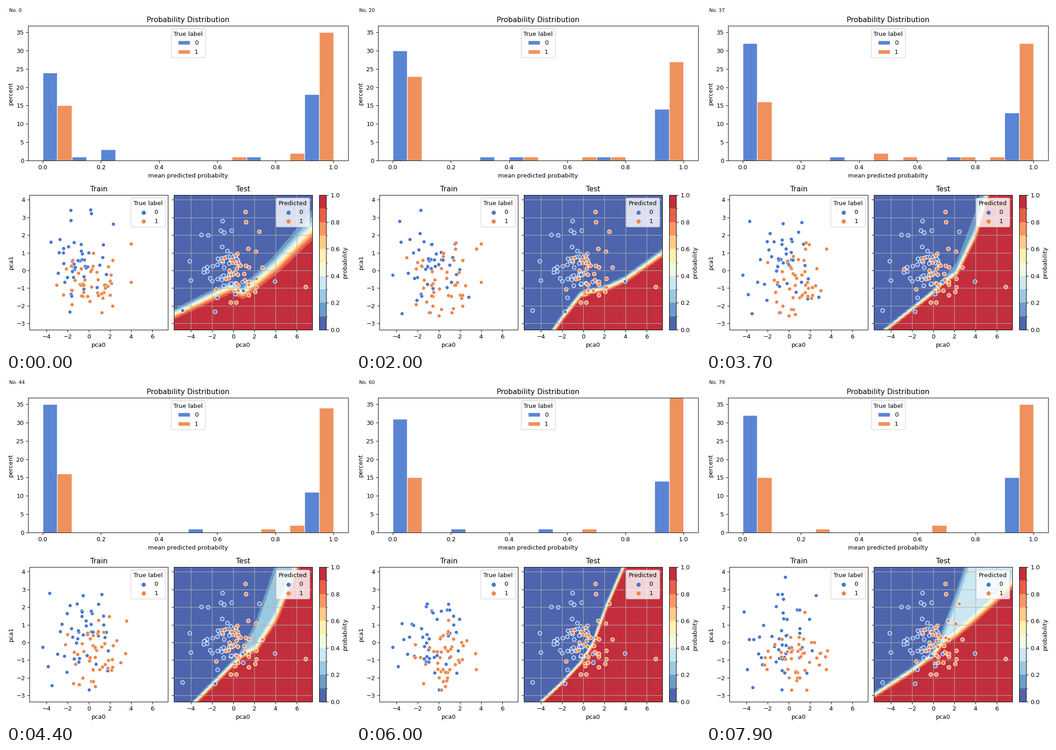
Write a matplotlib script that moves like this. It is 748x748 px and loops after 8 s.

```python
import numpy as np
import matplotlib.pyplot as plt
from matplotlib.animation import FuncAnimation
from matplotlib.cm import ScalarMappable
from matplotlib.colors import BoundaryNorm, ListedColormap
from matplotlib.patches import Patch

SIZE, FRAMES = 748, 80
COLORS = np.array(["#4878D0", "#EE854A"])
XLIM, YLIM = (-5.61, 7.48), (-3.36, 4.27)
PX_X, PX_Y = 23.0, 38.4  # pixels per data unit
X, Y = np.linspace(*XLIM, 66), np.linspace(*YLIM, 39)

# Poses of the model: everything in between is interpolated
KEYS = np.array([0, 12, 28, 37, 51, 60, 79])
TOTALS = (47, 53)
HEADS = np.array([(24, 28, 31, 32, 36, 31, 32), (15, 21, 24, 16, 18, 15, 15)])
TAILS = np.array([(18, 18, 12, 13, 11, 14, 15), (35, 30, 25, 32, 33, 37, 35)])
NODES = (-5.6, -2, -.2, .9, 2.2, 4, 7.5)
EDGE = np.array([  # height of the decision edge at each node
    (-2.5, -1.45, -.97, -1.3, -.7, .15, 2.2),
    (-8, -3.25, -1.15, -.27, .08, .9, 3.4),
    (-3.5, -2.1, -1.55, -2.05, -2.1, -1.97, -1.58),
    (-3.9, -2.2, -1.35, -.72, -.2, 2, 9),
    (-4.9, -2.5, -1.25, -.77, -.6, .4, 3.45),
    (-4.3, -2.3, -1.15, -.13, 2, 4.5, 10),
    (-3, -1.6, -.8, -.08, .4, 1.33, 3.25)])
LIFT = np.array([.15, 0, 0, .4, 1.3, 0, 1.25])      # slope of the plateau edge
PLATEAU = np.array([.25, 0, 0, .15, .35, 0, .35])   # probability on it
SOFT = np.array([5.5, 2.2, 3, 2.2, 3, 1.8, 3])      # blur in pixels

rng = np.random.default_rng(7)


def span(n):
    """Key interval holding frame n and the fraction through it."""
    i = min(np.searchsorted(KEYS, n, "right") - 1, len(KEYS) - 2)
    return i, (n - KEYS[i]) / (KEYS[i + 1] - KEYS[i])


def mix(values, n):
    i, f = span(n)
    return values[i] * (1 - f) + values[i + 1] * f


def noise(n, size, seed=0):
    """Retraining noise, fading out at the keys."""
    r = np.random.default_rng((seed, n))
    return np.sin(np.pi * span(n)[1]) * r.normal(size=size)


def step(h, soft):
    slope = np.gradient(h, X) * PX_Y / PX_X
    d = (h - Y[:, None]) * PX_Y / np.sqrt(1 + slope ** 2)
    return 1 / (1 + np.exp(-np.clip(d / soft, -12, 12)))


def field(n):
    shift, tilt = noise(n, 2) * (.15, .04)
    lower = np.interp(X, NODES, mix(EDGE, n)) + shift + tilt * X
    upper = lower + mix(LIFT, n) * np.maximum(X - .4, 0)
    soft = mix(SOFT, n) * np.linspace(.8, 1.3, X.size)
    c = mix(PLATEAU, n)
    return c * step(upper, soft) + (1 - c) * step(lower, soft)


def counts(n, label):
    head, tail = mix(HEADS[label], n), mix(TAILS[label], n)
    jitter = noise(n, 1, 1 + label)[0]
    out = np.zeros(10, int)
    out[0], out[9] = round(head + jitter), round(tail - jitter)
    r = np.random.default_rng((3 + label, n))
    for b in r.integers(1, 9, max(TOTALS[label] - out.sum(), 0)):
        out[b] += 1
    return out


def cloud(shape, mean, sd, clip):
    return mean + sd * np.clip(rng.normal(size=(*shape, 2)), -clip, clip)


# Training sample: slots whose points are replaced one after another
LIFE, SLOTS = 33, 46
TRAIN = [cloud((SLOTS, 4), (-.6, .5), (1.7, 1.45), 2.2),
         cloud((SLOTS, 4), (.5, -.5), (1.6, 1.0), 2.2)]
OFFSETS = [rng.permutation(SLOTS) * LIFE / SLOTS for _ in TRAIN]


def train_points(n, label):
    age = ((n + OFFSETS[label]) // LIFE).astype(int)
    return TRAIN[label][np.arange(SLOTS), age]


# Test sample: two clouds and a few far points; scores drift around zero
FAR0 = [(-1, 2.79), (-3, 2.01), (-4.1, .52), (-4, -.57), (-4.78, -2.27),
        (3.96, -.63), (-1.7, -2.34)]
FAR1 = [(1.17, 3.31), (1.22, 2.73), (2.48, 2.19), (6.87, -.94),
        (2.09, -1.22), (.3, -1.82), (2.78, .16)]
TEST = np.vstack([FAR0, cloud((42,), (-1, .35), (1.0, 1.0), 1.9),
                  FAR1, cloud((38,), (.3, -.3), (1.0, .8), 1.9)])
SCORE = np.repeat([-1, 1], [49, 45]) + rng.normal(0, .4, len(TEST))
PHASE = rng.uniform(0, 2 * np.pi, len(TEST))


def predicted(n):
    return (SCORE + .5 * np.sin(PHASE * (1 + n / 12)) > 0).astype(int)


fig = plt.figure(figsize=(8, 8), dpi=SIZE / 8)


def panel(left, top, right, bottom, **kw):
    return fig.add_axes([left / SIZE, 1 - bottom / SIZE,
                         (right - left) / SIZE, (bottom - top) / SIZE], **kw)


def dot_legend(ax, title):
    dots = [ax.scatter([], [], s=36, color=c) for c in COLORS]
    ax.legend(dots, ["0", "1"], title=title, loc="upper right")


number = fig.text(.01, 1 - 13 / SIZE, "", fontsize=8)

hist = panel(48, 43, 744, 336, xlim=(-.05, 1.05), ylim=(0, 36.75),
             title="Probability Distribution", ylabel="percent",
             xlabel="mean predicted probabilty")
style = dict(edgecolor="white", linewidth=1, alpha=.9)
bars = [hist.bar(np.arange(10) / 10 + .05 * k, np.zeros(10), .05,
                 align="edge", color=c, **style)
        for k, c in enumerate(COLORS)]
hist.legend([Patch(facecolor=c, **style) for c in COLORS], ["0", "1"],
            title="True label", loc="upper center")

ticks = dict(xlim=XLIM, ylim=YLIM, xticks=range(-4, 7, 2),
             yticks=range(-3, 5), xlabel="pca0")
train = panel(51, 411, 352, 704, title="Train", ylabel="pca1", **ticks)
train_dots = train.scatter([], [], s=36, edgecolors="white", linewidths=.48)
dot_legend(train, "True label")

test = panel(365, 411, 666, 704, title="Test", **ticks)
test.tick_params(labelleft=False)
test.grid(True)
test_dots = test.scatter(*TEST.T, s=40, edgecolors="white", linewidths=1,
                         zorder=1.1)
dot_legend(test, "Predicted")

levels = np.linspace(0, 1, 11)
shades = plt.get_cmap("RdYlBu_r")(np.arange(.05, 1, .1))[:, :3]
cmap = ListedColormap(.9 * shades + .1)  # lightened towards white
norm = BoundaryNorm(levels, 10)
fig.colorbar(ScalarMappable(norm, cmap), cax=panel(681, 411, 696, 704),
             ticks=levels[::2], label="probability")
contour = None


def draw(n):
    global contour
    number.set_text(f"No. {n}")
    for label, group in enumerate(bars):
        for bar, h in zip(group, counts(n, label)):
            bar.set_height(h)

    train_dots.set_offsets(np.vstack([train_points(n, k) for k in (0, 1)]))
    train_dots.set_facecolor(np.repeat(COLORS, SLOTS))

    if contour is not None:
        contour.remove()
    contour = test.contourf(X, Y, field(n), levels, cmap=cmap, norm=norm,
                            zorder=1)
    test.set(xlim=XLIM, ylim=YLIM)
    test_dots.set_facecolor(COLORS[predicted(n)])


anim = FuncAnimation(fig, draw, frames=FRAMES, init_func=lambda: None,
                     interval=100, repeat=True, repeat_delay=0)
plt.show()
```
